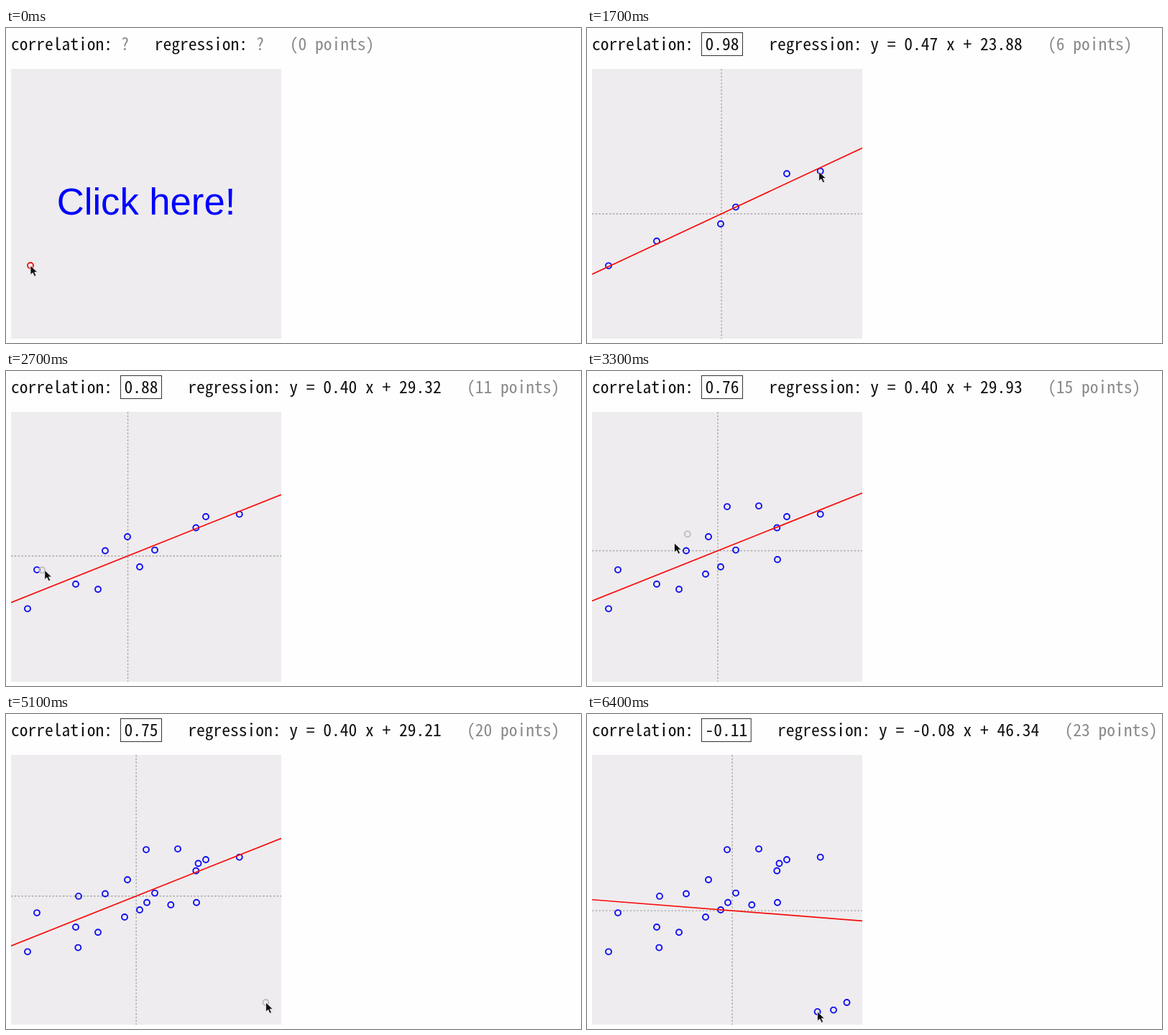
An HTML page that plays this animation: 800x439 px, repeating every 7 s.

```html
<!DOCTYPE html>
<html lang="en">
<head>
<meta charset="utf-8">
<title>Correlation and regression</title>
<style>
  html, body { margin: 0; width: 100%; height: 100%; overflow: hidden; background: #fefefe; }
  svg { display: block; width: 800px; height: 439px; }
  .head text { font: 23.5px "Noto Sans Mono CJK JP", "Noto Sans Mono CJK SC", "Noto Sans Mono", monospace; fill: #111; }
  .head .dim { fill: #8a8a8a; }
  .hint { font: 52.64px "Liberation Sans", Arial, sans-serif; fill: #00f; text-anchor: middle; }
  .mean { stroke: #a6a6a6; stroke-width: 1.4; stroke-dasharray: 2.4 2.4; }
  .ring { fill: none; stroke-width: 1.9; }
</style>
</head>
<body>
<svg viewBox="0 0 800 439">
  <defs><clipPath id="panel"><rect x="7" y="57" width="376" height="376"/></clipPath></defs>
  <g class="head">
    <text x="7" y="31">correlation:</text>
    <rect id="frame" x="159.5" y="6.5" height="32" fill="none" stroke="#333"/>
    <text id="corr" y="31"></text>
    <text id="regLabel" y="31">regression:</text>
    <text id="reg" y="31"></text>
    <text id="count" y="31" class="dim"></text>
  </g>
  <rect x="7" y="57" width="376" height="376" fill="#eeecee"/>
  <text id="hint" class="hint" x="195" y="260"></text>
  <g clip-path="url(#panel)">
    <g id="fit">
      <line id="meanX" class="mean" y1="57" y2="433"/>
      <line id="meanY" class="mean" x1="7" x2="383"/>
    </g>
    <g id="dots" class="ring" stroke="#1010f0"></g>
    <line id="line" x1="7" x2="383" stroke="#f80c0c" stroke-width="1.7"/>
    <circle id="ghost" class="ring" r="4"/>
  </g>
  <path id="cursor" d="M0 0V13L3.2 10.2L5.6 15.3L8 14.2L5.7 9.3H9.8Z" fill="#111" stroke="#f4f4f4" stroke-width=".8"/>
</svg>
<script>
const LOOP = 7000, STEP = 100, LAG = 33, TRAVEL = 0.75;
const LEFT = 7, BOTTOM = 433, UNIT = 3.76, PITCH = 11.75;
const $ = id => document.getElementById(id);

// bouts of evenly paced clicks: start, gap, points
const bouts = [
  [300, 200, [30, 331.37], [97, 297]],
  [900, 266, [186, 273], [207, 249.6], [278, 203], [324.7, 199.6]],
  [1854, 210, [264.3, 218.5], [169, 231], [138, 250.5], [128, 304.3], [43, 277.1]],
  [2870, 110, [165, 283], [265, 262.7], [239, 188.1], [195, 189.1]],
  [3450, 250, [101, 253.9], [196, 262.8], [229.3, 266], [267.5, 208.3]],
  [4700, 500, [100.3, 325.6], [361.5, 402], [343, 412.6], [320.6, 414.9]]
];
const clicks = bouts.flatMap(([start, gap, ...pts]) =>
  pts.map(([x, y], i) => ({ t: start + i * gap, x, y })));
const stops = [{ t: 200, x: 34, y: 331 }, ...clicks];

const dots = clicks.map(({ x, y }) => {
  const c = document.createElementNS("http://www.w3.org/2000/svg", "circle");
  set(c, { cx: x, cy: y, r: 4 });
  $("dots").append(c);
  return c;
});

function set(el, attrs) {
  for (const k in attrs) el.setAttribute(k, attrs[k]);
}

function put(id, x, text) {
  const el = $(id);
  el.setAttribute("x", x);
  if (text !== undefined) el.textContent = text;
}

function show(el, on) {
  el.style.display = on ? "" : "none";
}

// the pointer eases out to the next stop and rests there before clicking
function between(a, b, elapsed) {
  const k = Math.min(1, elapsed / ((b.t - a.t) * TRAVEL));
  const e = 1 - (1 - k) ** 2;
  return [a.x + (b.x - a.x) * e, a.y + (b.y - a.y) * e];
}

function pointer(t) {
  const next = stops.findIndex(s => s.t > t);
  const b = stops.at(next), a = next > 0 ? stops[next - 1] : b;
  if (a === b) return { tip: [a.x, a.y], trail: [a.x, a.y] };
  const elapsed = t - a.t;
  return {
    tip: between(a, b, elapsed),
    trail: between(a, b, elapsed - Math.min(LAG, elapsed * 0.35))
  };
}

function regress(n) {
  const pts = clicks.slice(0, n).map(({ x, y }) => [(x - LEFT) / UNIT, (BOTTOM - y) / UNIT]);
  const mean = k => pts.reduce((s, p) => s + p[k], 0) / n;
  const mx = mean(0), my = mean(1);
  let xx = 0, yy = 0, xy = 0;
  for (const [x, y] of pts) {
    xx += (x - mx) ** 2;
    yy += (y - my) ** 2;
    xy += (x - mx) * (y - my);
  }
  const slope = xy / xx;
  return { mx, my, r: xy / Math.sqrt(xx * yy), slope, base: my - slope * mx };
}

function drawHead(n, f) {
  let x = LEFT + 13 * PITCH, reg = "?";
  show($("frame"), f);
  if (f) {
    const r = f.r.toFixed(2), w = r.length * PITCH + 10;
    $("frame").setAttribute("width", w);
    put("corr", 164.6, r);
    x = 161 + w + 3 * PITCH;
    reg = `y = ${f.slope.toFixed(2)} x + ${f.base.toFixed(2)}`;
  } else {
    put("corr", x, "?");
    x += 4 * PITCH;
  }
  put("regLabel", x);
  put("reg", x += 12 * PITCH, reg);
  put("count", x + (reg.length + 3) * PITCH, `(${n} points)`);
  for (const id of ["corr", "reg"]) $(id).setAttribute("class", f ? "" : "dim");
}

function draw(t) {
  const n = clicks.filter(c => c.t <= t).length;
  const f = n > 1 ? regress(n) : null;
  drawHead(n, f);

  $("hint").textContent = n ? "More & more!" : "Click here!";
  $("hint").style.opacity = n < 3 ? 0.3 ** n : 0;

  dots.forEach((d, i) => show(d, i < n));
  show($("fit"), f);
  show($("line"), f);
  if (f) {
    const px = LEFT + f.mx * UNIT, py = BOTTOM - f.my * UNIT;
    set($("meanX"), { x1: px, x2: px });
    set($("meanY"), { y1: py, y2: py });
    set($("line"), { y1: BOTTOM - f.base * UNIT, y2: BOTTOM - (f.base + f.slope * 100) * UNIT });
  }

  const { tip: [x, y], trail: [cx, cy] } = pointer(t);
  const last = clicks[n - 1];
  $("cursor").setAttribute("transform", `translate(${x} ${y})`);
  set($("ghost"), { cx, cy, stroke: n ? "#bdbdbd" : "#f01818" });
  show($("ghost"), !last || Math.hypot(x - last.x, y - last.y) > 4);
}

const start = performance.now();
function tick() {
  const t = (performance.now() - start) % LOOP;
  draw(Math.floor(t / STEP) * STEP);
  requestAnimationFrame(tick);
}
tick();
</script>
</body>
</html>
```
